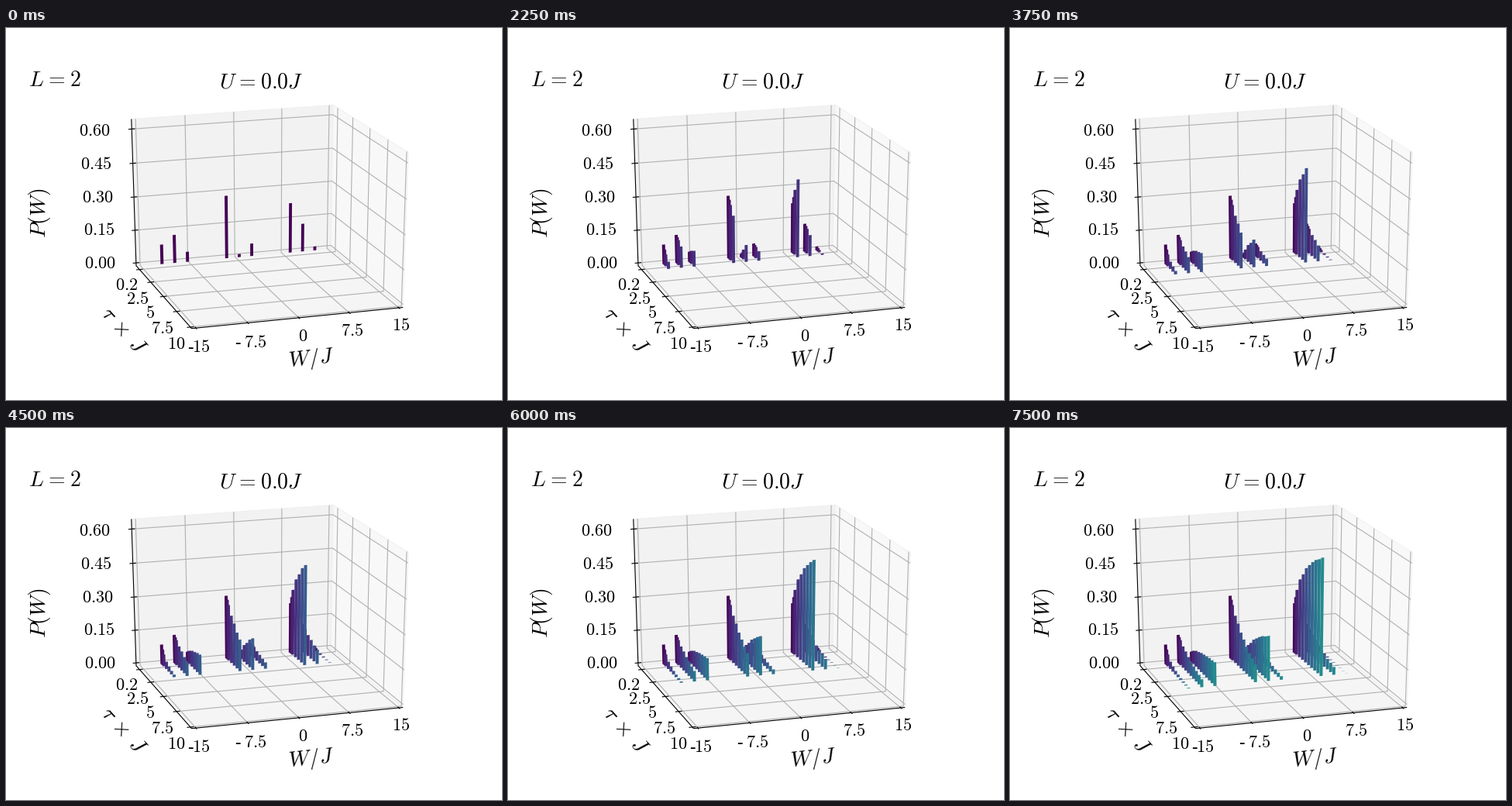
A matplotlib script for the animation above (8 s loop, 640 by 480 pixels).

```python
import numpy as np
import matplotlib.pyplot as plt
from matplotlib.animation import FuncAnimation
from matplotlib.collections import PolyCollection

plt.rcParams["mathtext.fontset"] = "cm"

WIDTH, HEIGHT, DPI = 640, 480, 100
AZIM, ELEV = np.radians(-17.5), np.radians(21)
SCALE = np.array([268.1, -199.8])
CENTER = np.array([334.7, 237.4])
DIST = 10
T_MIN, T_MAX, W_MAX, Z_MAX = -0.3, 10, 15, 0.63
PAD = 1 / 48
TICK = 1 / 60

T_TICKS = [0.2, 2.5, 5, 7.5, 10]
W_TICKS = [-15, -7.5, 0, 7.5, 15]
Z_TICKS = [0, 0.15, 0.3, 0.45, 0.6]

# Ramp times shown so far, out of 22 in the full sweep
TIMES = [0.1, 0.3, *np.arange(0.5, 4.6, 0.5)]
SWEEP = 22
FLIP = [0.385, 0.343, 0.298, 0.233, 0.198, 0.160,
        0.137, 0.115, 0.097, 0.085, 0.070]
RATIO = 0.45
GAP = 10.2
BAR_LEFT, BAR_RIGHT = -0.07, 0.41

RIGHT = np.array([-np.sin(AZIM), np.cos(AZIM), 0])
UP = np.array([-np.cos(AZIM) * np.sin(ELEV), -np.sin(AZIM) * np.sin(ELEV),
               np.cos(ELEV)])
TOWARD = np.cross(RIGHT, UP)


def project(t, w, z):
    """Unit-box coordinates (0..1 on each axis) to stage pixels."""
    p = np.array([t, w, z]) - 0.5
    depth = DIST - p @ TOWARD
    return CENTER + SCALE * np.array([p @ RIGHT, p @ UP]) * DIST / depth


def unit_t(t):
    return (t - T_MIN) / (T_MAX - T_MIN)


def unit_w(w):
    return (w + W_MAX) / (2 * W_MAX)


fig = plt.figure(figsize=(WIDTH / DPI, HEIGHT / DPI), dpi=DPI, facecolor="white")
ax = fig.add_axes([0, 0, 1, 1])
ax.set_xlim(0, WIDTH)
ax.set_ylim(HEIGHT, 0)
ax.axis("off")

LO, HI = -PAD, 1 + PAD


def path(points, color, z):
    xy = np.array([project(*p) for p in points])
    ax.plot(xy[:, 0], xy[:, 1], color=color, lw=0.8, zorder=z,
            solid_capstyle="butt")


def pane(corners, color):
    ax.add_patch(plt.Polygon([project(*c) for c in corners], fc=color,
                             ec="#efefef", lw=0.6, zorder=1))


def label(x, y, text, size=16, angle=0):
    ax.text(x, y, text, fontsize=size, rotation=angle, ha="center",
            va="center", color="black", zorder=6)


def draw_box():
    pane([(LO, LO, LO), (LO, HI, LO), (LO, HI, HI), (LO, LO, HI)], "#f2f2f2")
    pane([(LO, HI, LO), (HI, HI, LO), (HI, HI, HI), (LO, HI, HI)], "#f8f8f8")
    pane([(LO, LO, LO), (LO, HI, LO), (HI, HI, LO), (HI, LO, LO)], "#f5f5f5")

    grid = "#b0b0b0"
    for t in map(unit_t, T_TICKS):
        path([(t, LO, LO), (t, HI, LO), (t, HI, HI)], grid, 2)
        path([(t, LO - TICK, LO), (t, LO + TICK, LO)], "black", 3)
    for w in map(unit_w, W_TICKS):
        path([(HI, w, LO), (LO, w, LO), (LO, w, HI)], grid, 2)
        path([(HI + TICK, w, LO), (HI - TICK, w, LO)], "black", 3)
    for v in Z_TICKS:
        z = v / Z_MAX
        path([(LO, LO, z), (LO, HI, z), (HI, HI, z)], grid, 2)
        path([(LO, LO - TICK, z), (LO, LO + TICK, z)], "black", 3)

    path([(LO, LO, HI), (LO, LO, LO), (HI, LO, LO), (HI, HI, LO)], "black", 3)


def draw_labels():
    equals = r"\hspace{0.06}=\hspace{0.06}"
    times = r"\hspace{0.2}\times\hspace{0.2}"
    label(62.5, 67, f"$L{equals}2$", 20)
    label(329.5, 69, f"$U{equals}0.0J$", 20)
    label(43, 239, r"$P(W)$", 20, 90)
    label(152.5, 389.5, rf"$\tau{times}J$", 20, -48)
    label(394.5, 427, r"$W/J$", 20, 6)

    for i, v in enumerate(Z_TICKS):
        label(121.5 - 1.7 * i, 304 - 42.7 * i, f"${v:.2f}$")
    t_spots = [(156, 332), (170, 349.5), (185.5, 368), (202, 388.5), (219.5, 408)]
    for (x, y), v in zip(t_spots, T_TICKS):
        label(x, y, f"${v:g}$")
    w_spots = [(252, 411.5), (322, 405.5), (383, 398.5), (446.5, 391), (510, 384)]
    for (x, y), v in zip(w_spots, W_TICKS):
        label(x, y, f"${abs(v):g}$")
    for x, y in [(238, 418.5), (299, 412.5)]:
        ax.text(x, y, "-", fontsize=16, family="Liberation Serif",
                ha="center", va="baseline", zorder=6)


def work_distribution(q):
    """Work values and probabilities for a spin-1 triplet with flip chance q."""
    pop = np.array([1, RATIO, RATIO ** 2])
    pop /= pop.sum()
    mix = 2 * q * (1 - q)
    jump = np.array([[q ** 2, mix, (1 - q) ** 2],
                     [mix, (1 - 2 * q) ** 2, mix],
                     [(1 - q) ** 2, mix, q ** 2]])
    for i, start in enumerate((2, 0, -2)):
        for j, end in enumerate((-GAP, 0, GAP)):
            yield end - start, pop[i] * jump[i, j]


def bar(t, w, h):
    """Flat upright bar standing in the plane of one ramp time."""
    t, h = unit_t(t), h / Z_MAX
    w0, w1 = unit_w(w + BAR_LEFT), unit_w(w + BAR_RIGHT)
    return [project(t, a, b) for a, b in [(w0, 0), (w1, 0), (w1, h), (w0, h)]]


draw_box()
draw_labels()
rows = [[bar(t, w, h) for w, h in work_distribution(q)]
        for t, q in zip(TIMES, FLIP)]
colors = plt.get_cmap("viridis")(np.arange(len(rows)) / (SWEEP - 1))
bars = PolyCollection([], linewidths=0, zorder=5)
ax.add_collection(bars, autolim=False)


def update(i):
    count = min(i // 3 + 1, len(rows))
    bars.set_verts([xy for row in rows[:count] for xy in row])
    bars.set_facecolor(np.repeat(colors[:count], len(rows[0]), axis=0))
    return [bars]


anim = FuncAnimation(fig, update, frames=32, interval=250, repeat=True,
                     repeat_delay=0, init_func=lambda: update(0), blit=False)
plt.show()
```
